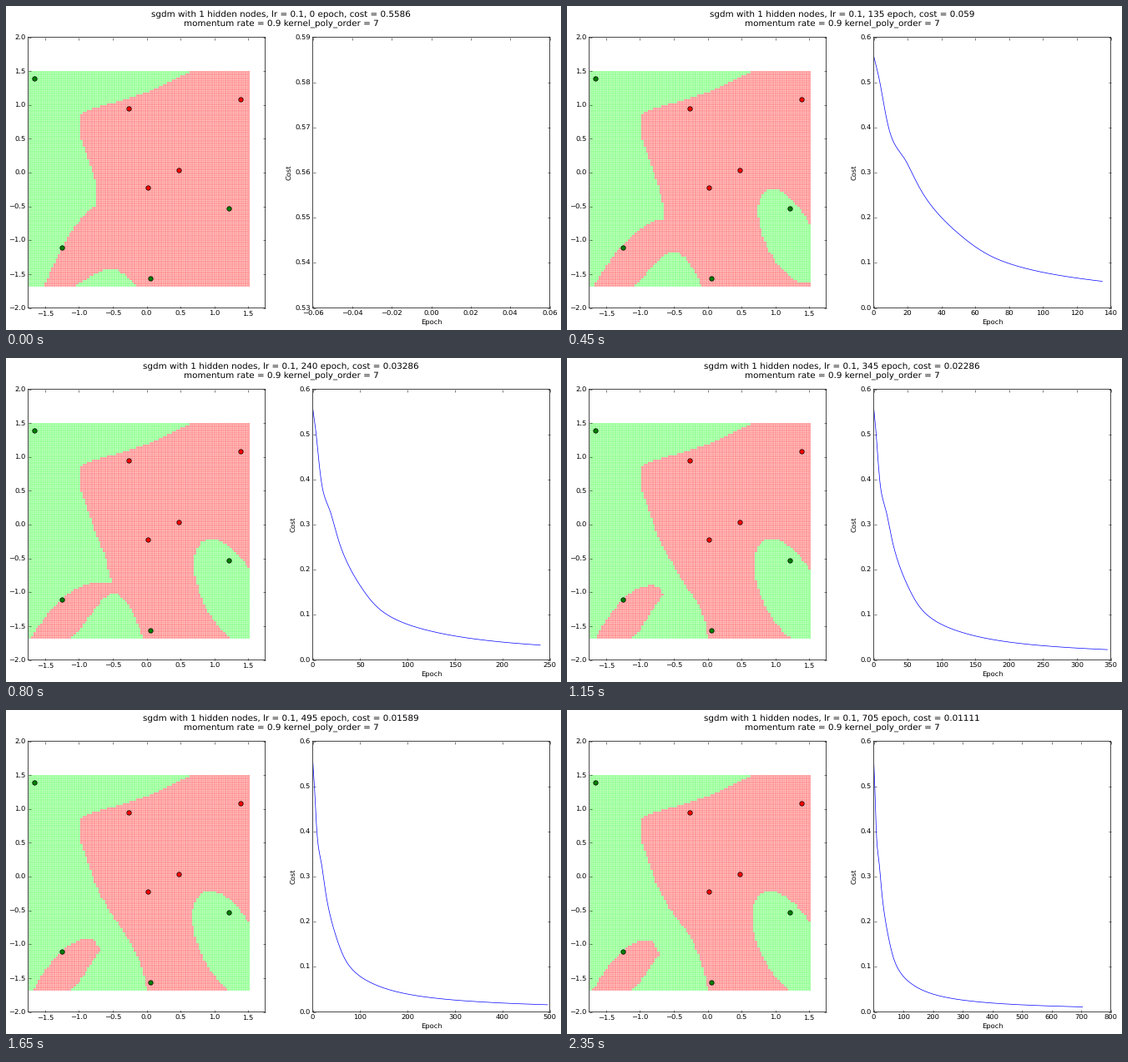
Write a matplotlib script that moves like this. It is 665 px wide and 389 px high and loops after 2400 ms.

```python
import matplotlib.pyplot as plt
import numpy as np
from matplotlib.animation import FuncAnimation
from matplotlib.ticker import MaxNLocator

W, H, DPI = 665, 389, 100
FRAMES, INTERVAL = 48, 50
EPOCHS_PER_FRAME = 15
PT = 72 / DPI  # points per pixel

plt.rcParams.update({
    "font.family": "DejaVu Sans", "font.size": 8.33 * PT,
    "text.hinting": "none", "path.snap": False,
    "axes.linewidth": 0.7 * PT, "axes.labelpad": 2.2 * PT,
    "xtick.direction": "in", "ytick.direction": "in",
    "xtick.top": True, "ytick.right": True,
    "xtick.major.size": 2.8 * PT, "ytick.major.size": 2.8 * PT,
    "xtick.major.width": 0.5 * PT, "ytick.major.width": 0.5 * PT,
    "xtick.major.pad": 2.9 * PT, "ytick.major.pad": 2.9 * PT,
})


def smooth(x, xs, ys):
    """Cubic Hermite curve through the points (xs, ys)."""
    xs, ys = np.asarray(xs, float), np.asarray(ys, float)
    slopes = np.gradient(ys, xs)
    i = np.clip(np.searchsorted(xs, x, side="right") - 1, 0, len(xs) - 2)
    h = xs[i + 1] - xs[i]
    t = (x - xs[i]) / h
    return ((1 + 2 * t) * (1 - t) ** 2 * ys[i] + t * (1 - t) ** 2 * h * slopes[i]
            + t * t * (3 - 2 * t) * ys[i + 1] + t * t * (t - 1) * h * slopes[i + 1])


# The inverse of the training cost grows almost linearly after a wavy start.
KNOTS = [0, 3, 10, 20, 30, 50, 75, 135, 240, 345, 495, 705]
COSTS = [.5586, .512, .384, .319, .248, .165, .1052, .059, .03286, .02286, .01589, .01111]
epochs = np.arange(FRAMES * EPOCHS_PER_FRAME)
costs = 1 / smooth(epochs, KNOTS, 1 / np.array(COSTS))

# Shape parameters of the decision regions at a few training stages
STAGES = np.array([0, 75, 240, 345, 705])
SHAPE = {
    "waist": (-.76, -.71, -.61, -.57, -.55),      # left border at y = -0.5
    "hip": (-.76, -.70, -.51, -.37, -.29),        # left border at y = -0.85
    "crest_x": (-.5, -.4, -.7, -.82, -.88),       # top of the lower left tongue
    "crest_y": (-.4, -.5, -.855, -.9, -.94),
    "bend": (1.25, .75, .8, 1.1, 1.1),            # its curvature on either side
    "drop": (0, 0, 0, 5, 8),
    "bump_end": (-.15, -.12, -.05, -.04, 0),
    "bump_height": (.275, .39, .68, .78, .77),
    "pocket_x": (1.25, 1.15, 1.22, 1.205, 1.185),
    "pocket_y": (-.95, -.88, -1, -1, -1),
    "pocket_w": (-.2, .315, .45, .45, .46),
    "pocket_h": (-.3, .6, .785, .785, .785),
}
BUMP_START, FLOOR = -1.15, -1.7


def shape_at(epoch):
    pace = np.log(1 + epoch / 15)
    return {k: np.interp(pace, np.log(1 + STAGES / 15), v) for k, v in SHAPE.items()}


def is_green(x, y, epoch):
    s = shape_at(epoch)

    border = smooth(y, [-1.7, -1.25, -.85, -.5, -.1, .2, .75, .9, 1.03, 1.175, 1.33, 1.5],
                    [0, -.11, s["hip"], s["waist"], -.77, -.87, -.98, -.92, -.5, -.03, .3, .67])
    dx = x - s["crest_x"]
    tongue = s["crest_y"] - np.where(dx < 0, s["bend"], s["drop"]) * dx ** 2
    left = (x < border) & (y > tongue)

    u = np.clip((x - BUMP_START) / (s["bump_end"] - BUMP_START), 0, 1)
    bump = y < FLOOR + s["bump_height"] * np.sin(np.pi * u ** 1.36)

    # Slanted ellipse, absent while its size is negative
    dy = y - s["pocket_y"]
    slant = x - s["pocket_x"] + .35 * dy
    pocket = (s["pocket_w"] > 0) & (np.hypot(slant / s["pocket_w"], dy / s["pocket_h"]) < 1)
    return left | bump | pocket


# Stage
fig = plt.figure(figsize=(W / DPI, H / DPI), dpi=DPI, facecolor="white")


def add_axes(left):
    return fig.add_axes([left / W, 1 - 362.5 / H, 284 / W, 325 / H])


plane, chart = add_axes(26.5), add_axes(367.5)

CELLS = 100
RED, GREEN = np.array([255, 148, 148]), np.array([148, 255, 148])
x_edges = np.linspace(-1.773, 1.51, CELLS + 1)
y_edges = np.linspace(-1.685, 1.501, CELLS + 1)
gx, gy = np.meshgrid((x_edges[1:] + x_edges[:-1]) / 2, (y_edges[1:] + y_edges[:-1]) / 2)
area = (x_edges[0], x_edges[-1], y_edges[0], y_edges[-1])
regions = plane.imshow(np.full((CELLS, CELLS, 3), 255, np.uint8), origin="lower",
                       extent=area, aspect="auto", interpolation="nearest", zorder=0)
gaps = dict(colors="white", lw=0.25 * PT, zorder=1)
plane.vlines(x_edges, *area[2:], **gaps)
plane.hlines(y_edges, *area[:2], **gaps)

SAMPLES = {
    "red": [(-.264, .943), (1.392, 1.083), (.475, .037), (.019, -.222)],
    "green": [(-1.655, 1.388), (1.215, -.53), (-1.25, -1.113), (.056, -1.569)],
}
for color, points in SAMPLES.items():
    plane.plot(*zip(*points), "o", ms=5.4 * PT, mfc=color, mec="black",
               mew=0.7 * PT, zorder=3)
plane.set(xlim=(-1.75, 1.75), ylim=(-2, 2),
          xticks=np.arange(-1.5, 1.6, .5), yticks=np.arange(-2, 2.1, .5))

curve, = chart.plot([], [], color="blue", lw=0.7 * PT)
chart.set(xlabel="Epoch", ylabel="Cost")


def round_locator():
    return MaxNLocator(9, steps=[1, 2, 5, 10])


def round_limits(low, high):
    return round_locator().tick_values(low, high)[[0, -1]]


chart.xaxis.set_major_locator(round_locator())
chart.yaxis.set_major_locator(round_locator())


def add_title(baseline, text=""):
    return fig.text(329.5 / W, 1 - baseline / H, text, size=10.41 * PT,
                    ha="center", va="baseline")


title = add_title(12.5)
add_title(23.3, "momentum rate = 0.9 kernel_poly_order = 7")


def draw(frame):
    epoch = frame * EPOCHS_PER_FRAME
    cost = costs[epoch]
    title.set_text(f"sgdm with 1 hidden nodes, lr = 0.1, {epoch} epoch, cost = {cost:.4g}")

    green = is_green(gx, gy, epoch)[..., None]
    regions.set_data(np.where(green, GREEN, RED).astype(np.uint8))

    curve.set_data(epochs[:epoch + 1], costs[:epoch + 1])
    if frame:
        chart.set(xlim=round_limits(0, epoch), ylim=round_limits(cost, costs[0]))
    else:
        chart.set(xlim=(-.06, .06), ylim=(.53, .59))
    return regions, curve, title


anim = FuncAnimation(fig, draw, frames=FRAMES, interval=INTERVAL, repeat=True,
                     repeat_delay=0, blit=False)
plt.show()
```
